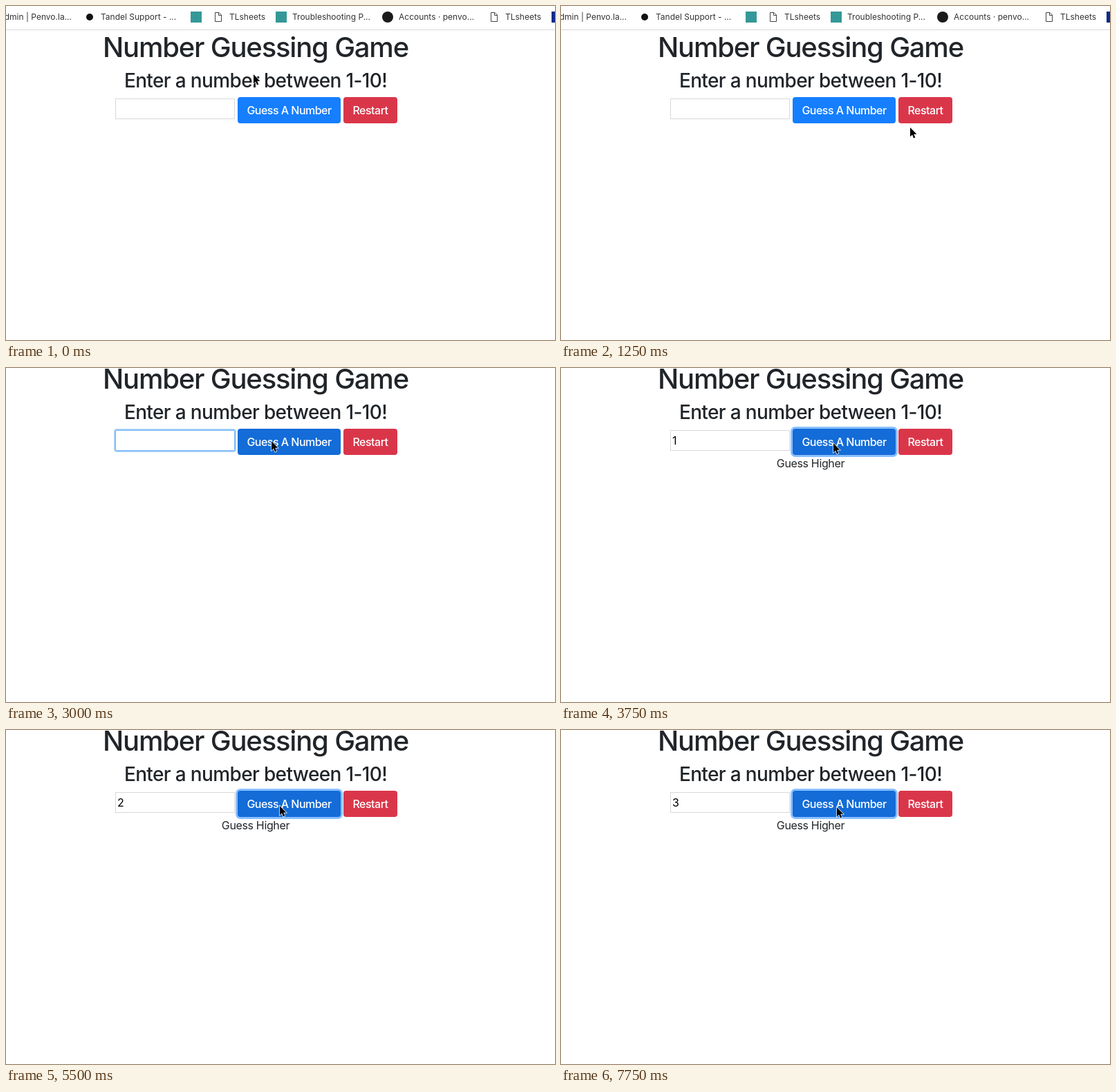
An HTML page for the animation above (8000 ms loop, 794x484 px).

```html
<!DOCTYPE html>
<html lang="en">
<head>
<meta charset="utf-8">
<title>Number Guessing Game</title>
<style>
  html, body { margin: 0; width: 100%; height: 100%; overflow: hidden; background: #fff; }
  body { position: relative; color: #212529; font: 16px Inter, Roboto, sans-serif; font-optical-sizing: none; letter-spacing: -.022em; }
  body * { box-sizing: border-box; }
  #page, #page > *, #bar > *, #cursor { position: absolute; }
  #page { left: 0; top: 0; width: 100%; height: 528px; white-space: pre; }
  .line { left: 61px; width: 600px; text-align: center; }
  h1, h2 { margin: 0; font-weight: 500; }
  h1 { top: 36px; font-size: 40px; line-height: 48px; letter-spacing: -.03em; }
  h2 { top: 91px; font-size: 28px; line-height: 34px; letter-spacing: -.023em; }
  #hint { top: 170px; line-height: 24px; }

  #bar { left: 0; top: 0; width: 100%; height: 35px; border-bottom: 1px solid #d9d9d9; color: #333; font-size: 12px; line-height: 32px; letter-spacing: 0; }
  .icon { top: 8px; width: 16px; height: 16px; }
  .dot { border-radius: 50%; }

  .button { top: 132px; height: 38px; border-radius: 4px; color: #fff; font-weight: 500; line-height: 38px; letter-spacing: -.033em; text-align: center; }
  #guess { left: 335px; width: 149px; background: #157fff; }
  #guess.hover { background: #136cd7; }
  #guess.ring { box-shadow: 0 0 0 3px #8abfff; }
  #restart { left: 488px; width: 78px; background: #da364a; }
  #restart.hover { background: #c52a3b; }
  #restart.ring { box-shadow: 0 0 0 3px #ed9aa5; }

  #field { left: 158px; top: 134px; width: 173px; height: 30px; padding: 5px 2px; border: 1px solid #d8d8d8; color: #000; line-height: 18px; }
  #field.focus { border-color: #81bcf7; box-shadow: 0 0 1px 1.5px #81bcf7; border-radius: 2px; }
  #value { display: inline-block; height: 18px; vertical-align: top; }
  #field.selected #value { background: #b4d7fe; }
  #field.caret #value { border-right: 1px solid #000; }
  #cursor { left: 0; top: 0; overflow: visible; }
</style>
</head>
<body>
<div id="page">
  <div id="bar"></div>
  <h1 class="line">Number Guessing Game</h1>
  <h2 class="line">Enter a number between 1-10!</h2>
  <div id="field"><span id="value"></span></div>
  <div id="guess" class="button">Guess A Number</div>
  <div id="restart" class="button">Restart</div>
  <div id="hint" class="line">Guess Higher</div>
</div>
<svg id="cursor" width="12" height="18">
  <path d="M0 0V13.4L3 10.6 5.1 15.6 7.3 14.6 5.2 9.7H9.4Z" stroke="#fff" stroke-width="1.4" paint-order="stroke"/>
</svg>
<script>
const $ = id => document.getElementById(id);

const label = (x, text) => `<span style="left:${x}px">${text}</span>`;
const mark = (x, color, shape = '') => `<i class="icon ${shape}" style="left:${x}px;background:${color}"></i>`;
const sheet = x => `<svg class="icon" style="left:${x}px" viewBox="0 0 16 16" fill="none" stroke="#444">
  <path d="M3.5 1.5H9L12.5 5V14.5H3.5ZM8.5 1.5V5.5H12.5"/></svg>`;

$('bar').innerHTML =
  '<span style="right:calc(100% - 95px)">Admin | Penvo.la...</span>' +
  '<i class="dot" style="left:116px;top:11px;width:10px;height:10px;background:#111"></i>' +
  label(137, 'Tandel Support - ...') +
  mark(267, '#359898') + sheet(299) + label(323, 'TLsheets') +
  mark(390, '#359898') + label(414, 'Troubleshooting P...') +
  mark(544, '#1b1b1b', 'dot') + label(568, 'Accounts · penvo...') +
  sheet(698) + label(722, 'TLsheets') + mark(789, '#0c2a8c');

// Steps: time, pointer x, pointer y, flags, field value.
// b bar shown, i field focus, c caret, s selection, g/G guess hover/ring,
// r/R restart hover/ring, m hint shown
const steps = [
  [0, 358, 99, 'b'],
  [250, 372, 62, 'b'],
  [500, 386, 20, 'b'],
  [750, -40, 0, ''],
  [1250, 505, 176, 'b'],
  [1500, 520, 150, 'brR'],
  [1750, 306, 134, 'R'],
  [2000, 262, 112, 'R'],
  [2250, 236, 106, 'R'],
  [2500, 236, 106, 'ic'],
  [2750, 300, 106, 'i'],
  [3000, 384, 106, 'ig'],
  [3250, 390, 108, 'igc', 1],
  [3500, 394, 109, 'ig', 1],
  [3750, 394, 109, 'gGm', 1],
  [4000, 370, 111, 'gGm', 1],
  [4250, 304, 108, 'iGmc', 1],
  [4500, 288, 107, 'ism', 1],
  [4750, 288, 107, 'imc', 2],
  [5000, 304, 108, 'im', 2],
  [5250, 372, 109, 'igm', 2],
  [5500, 396, 110, 'gGm', 2],
  [5750, 397, 111, 'gGm', 2],
  [6000, 392, 112, 'gGm', 2],
  [6250, 350, 112, 'gGm', 2],
  [6500, 308, 113, 'iGmc', 2],
  [6750, 292, 108, 'ism', 2],
  [7000, 292, 108, 'imc', 3],
  [7250, 318, 109, 'im', 3],
  [7500, 384, 111, 'igm', 3],
  [7750, 399, 112, 'gGm', 3]
];

function show([, x, y, flags, value = '']) {
  const has = f => flags.includes(f);
  const toggle = (id, name, f) => $(id).classList.toggle(name, has(f));
  $('page').style.top = has('b') ? '0' : '-44px';
  $('cursor').style.transform = `translate(${x}px, ${y}px)`;
  $('value').textContent = value;
  $('hint').style.visibility = has('m') ? 'visible' : 'hidden';
  toggle('field', 'focus', 'i');
  toggle('field', 'caret', 'c');
  toggle('field', 'selected', 's');
  toggle('guess', 'hover', 'g');
  toggle('guess', 'ring', 'G');
  toggle('restart', 'hover', 'r');
  toggle('restart', 'ring', 'R');
}

const start = performance.now();
function draw() {
  const t = (performance.now() - start) % 8000;
  show(steps.findLast(s => s[0] <= t));
  requestAnimationFrame(draw);
}
draw();
</script>
</body>
</html>
```
